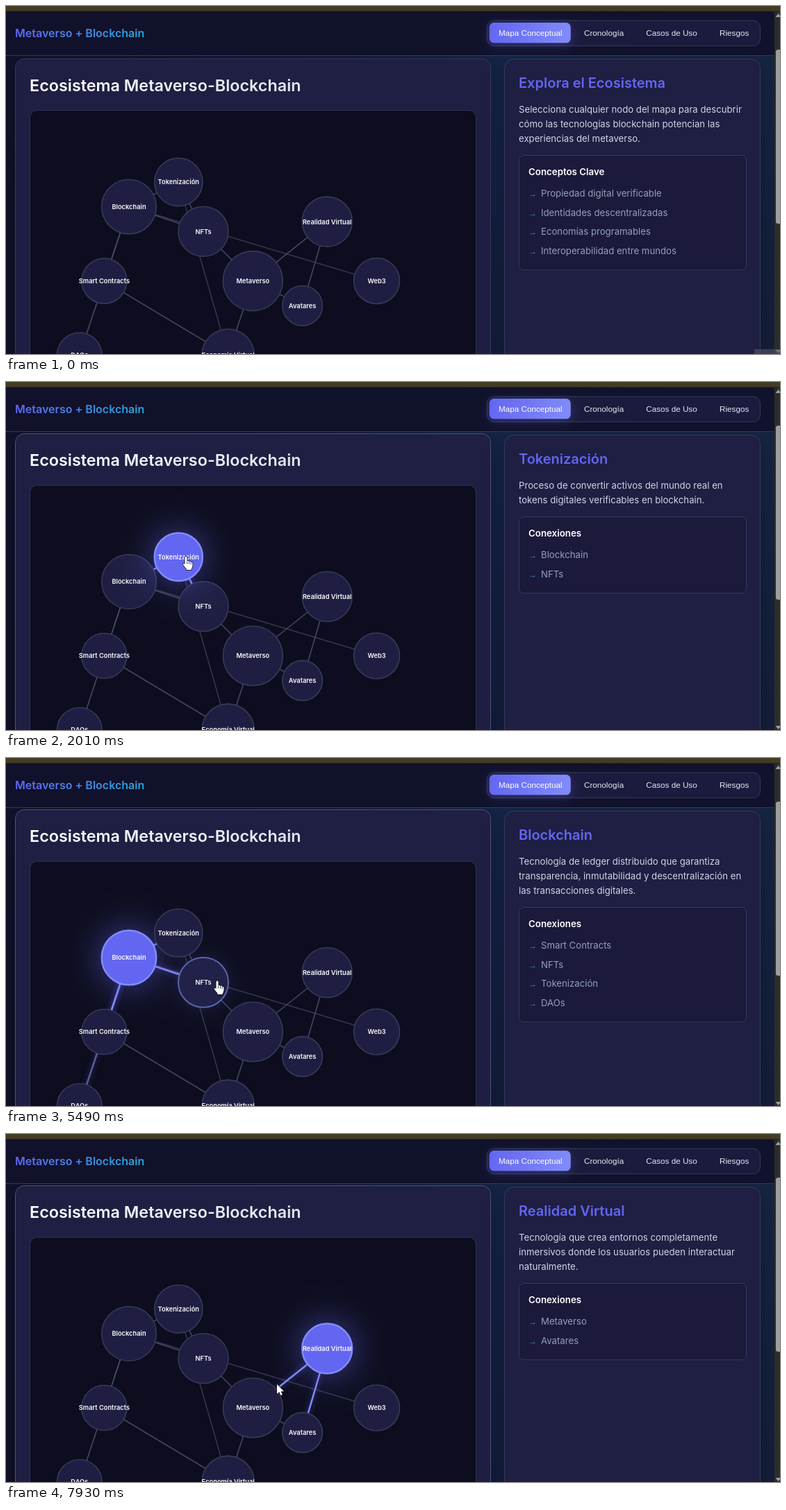
Write an HTML page with a canvas that moves like this. It is 1114 px wide and 502 px high and loops after 8 s.

```html
<!DOCTYPE html>
<html lang="es">
<head>
<meta charset="utf-8">
<title>Ecosistema</title>
<style>
html, body { margin: 0; width: 100%; height: 100%; overflow: hidden; background: #11112c; }
canvas { display: block; }
</style>
</head>
<body>
<canvas id="stage" width="1114" height="502"></canvas>
<script>
const ctx = document.getElementById('stage').getContext('2d');
const W = 1114, H = 502, LOOP = 8000;
const SANS = 'Inter, sans-serif';
const NAV = '"Liberation Sans", Arial, sans-serif';
const CARD = '#1f1e43', EDGE = '#343c5a';

// name: x, y, radius
const nodes = {
  'Metaverso': [355.3, 395, 43],
  'Blockchain': [177, 288, 39.3],
  'NFTs': [284, 323.7, 36],
  'Smart Contracts': [141.4, 395, 32.5],
  'DAOs': [105.8, 502, 32.3],
  'Realidad Virtual': [462.2, 309.5, 36],
  'Avatares': [426.6, 430.7, 28.8],
  'Economía Virtual': [319.6, 502, 37.6],
  'Web3': [533.5, 395, 33],
  'Tokenización': [248.3, 252.4, 34.6]
};

// from, to, strength
const links = [
  ['Blockchain', 'Web3', 1],
  ['Tokenización', 'Economía Virtual', 1],
  ['Blockchain', 'DAOs', 1],
  ['Blockchain', 'Smart Contracts', 2],
  ['Blockchain', 'NFTs', 2],
  ['Blockchain', 'Tokenización', 2],
  ['Tokenización', 'NFTs', 2],
  ['NFTs', 'Metaverso', 2],
  ['Metaverso', 'Realidad Virtual', 2],
  ['Metaverso', 'Avatares', 2],
  ['Metaverso', 'Economía Virtual', 2],
  ['Realidad Virtual', 'Avatares', 2],
  ['Smart Contracts', 'DAOs', 1],
  ['Smart Contracts', 'Economía Virtual', 2]
];

const intro = {
  title: 'Explora el Ecosistema',
  body: ['Selecciona cualquier nodo del mapa para descubrir',
    'cómo las tecnologías blockchain potencian las', 'experiencias del metaverso.'],
  head: 'Conceptos Clave',
  items: ['Propiedad digital verificable', 'Identidades descentralizadas',
    'Economías programables', 'Interoperabilidad entre mundos']
};
const details = {
  'Tokenización': {
    body: ['Proceso de convertir activos del mundo real en', 'tokens digitales verificables en blockchain.'],
    items: ['Blockchain', 'NFTs']
  },
  'Blockchain': {
    body: ['Tecnología de ledger distribuido que garantiza',
      'transparencia, inmutabilidad y descentralización en', 'las transacciones digitales.'],
    items: ['Smart Contracts', 'NFTs', 'Tokenización', 'DAOs']
  },
  'NFTs': {
    body: ['Tokens no fungibles que representan la propiedad',
      'única de activos digitales como arte,', 'coleccionables, y elementos del metaverso.'],
    items: ['Metaverso', 'Blockchain', 'Tokenización']
  },
  'Realidad Virtual': {
    body: ['Tecnología que crea entornos completamente',
      'inmersivos donde los usuarios pueden interactuar', 'naturalmente.'],
    items: ['Metaverso', 'Avatares']
  }
};

const clicks = [[1610, 'Tokenización'], [3720, 'Blockchain'], [5900, 'NFTs'], [7430, 'Realidad Virtual']];
const hovers = [[960, 'Tokenización'], [3230, 'Blockchain'], [5080, ''], [5340, 'NFTs'],
  [6640, ''], [6800, 'Realidad Virtual'], [7700, '']];
// time, x, y of the pointer tip
const path = [[70, 1095, 500], [840, 437, 339], [1130, 259, 251], [2360, 259, 251], [3100, 225.5, 271],
  [3200, 225.5, 271], [3500, 195.5, 285], [4900, 195.5, 285], [5460, 304, 321], [6550, 304, 321],
  [6940, 456, 301], [7560, 456, 301], [7900, 390, 361]];

const clamp = v => Math.max(0, Math.min(1, v));
const smooth = v => v * v * (3 - 2 * v);
const ramp = (t, start, len = 300) => smooth(clamp((t - start) / len));
const mix = (a, b, k) => 'rgb(' + a.map((v, i) => Math.round(v + (b[i] - v) * k)) + ')';

// How far a node is into a state that starts and ends with the given events
function amount(events, name, t) {
  let best = 0;
  events.forEach(([start, who], i) => {
    if (who !== name) return;
    const end = events[i + 1] ? events[i + 1][0] : Infinity;
    best = Math.max(best, ramp(t, start) - ramp(t, end));
  });
  return best;
}

function pointer(t) {
  if (t < path[0][0]) return null;
  for (let i = 1; i < path.length; i++) {
    const [t0, x0, y0] = path[i - 1], [t1, x1, y1] = path[i];
    if (t < t1) {
      const k = smooth(clamp((t - t0) / (t1 - t0)));
      return [x0 + (x1 - x0) * k, y0 + (y1 - y0) * k];
    }
  }
  return path[path.length - 1].slice(1);
}

function linear(x0, y0, x1, y1, ...colors) {
  const g = ctx.createLinearGradient(x0, y0, x1, y1);
  colors.forEach((c, i) => g.addColorStop(i / (colors.length - 1), c));
  return g;
}

function box(x, y, w, h, r, fill, stroke) {
  ctx.beginPath();
  ctx.roundRect(x, y, w, h, r);
  ctx.fillStyle = fill;
  ctx.fill();
  if (!stroke) return;
  ctx.strokeStyle = stroke;
  ctx.lineWidth = 1;
  ctx.stroke();
}

function text(s, x, y, font, color, align = 'left') {
  ctx.font = font;
  ctx.fillStyle = color;
  ctx.textAlign = align;
  ctx.fillText(s, x, y);
}

function glow(color, blur, dy = 0) {
  ctx.shadowColor = color;
  ctx.shadowBlur = blur;
  ctx.shadowOffsetY = dy;
}

function card(x, y, w, h, stroke) {
  ctx.save();
  glow('rgba(0,0,0,.3)', 26, 7);
  box(x, y, w, h, 13, CARD);
  ctx.restore();
  box(x, y, w, h, 13, CARD, stroke);
}

function backdrop() {
  ctx.fillStyle = linear(0, 0, W, 0, '#11112c', '#131634', '#15264a', '#15253f');
  ctx.fillRect(0, 0, W, H);
  ctx.fillStyle = linear(0, 72, 0, H, 'rgba(15,15,40,0)', 'rgba(15,15,40,.3)');
  ctx.fillRect(0, 72, W, H - 72);
}

function header() {
  ctx.fillStyle = linear(0, 0, W, 0, '#11112b', '#10112a', '#11132e');
  ctx.fillRect(0, 7, W, 64);
  ctx.fillStyle = '#2f3a58';
  ctx.fillRect(0, 71, W, 1);
  text('Metaverso + Blockchain', 13, 45, '600 16.05px ' + SANS, linear(13, 0, 200, 0, '#6366f1', '#22a6da'));

  box(692.5, 21, 393, 36.5, 10, '#1b1b3d', '#303a58');
  ctx.save();
  glow('rgba(99,102,241,.32)', 15, 3);
  box(695.7, 24, 117, 29.3, 6.5, linear(696, 24, 812, 53, '#6366f1', '#818cf8'));
  ctx.restore();
  const tabs = [['Mapa Conceptual', 709], ['Cronología', 832], ['Casos de Uso', 921.3], ['Riesgos', 1027]];
  tabs.forEach(([s, x], i) => text(s, x, 43.3, '11.7px ' + NAV, i ? '#e2e8f0' : '#ffffff'));
}

function chrome(t) {
  ctx.fillStyle = '#413c23';
  ctx.fillRect(0, 0, W, 7.5);
  ctx.fillStyle = '#2c2c29';
  ctx.fillRect(1106, 8, 8, H - 8);
  box(1108, 63, 8, 251, 3, '#9d9d9d');
  ctx.fillStyle = '#a0a0a0';
  ctx.beginPath();
  ctx.moveTo(1107.5, 16);
  ctx.lineTo(1111.5, 11);
  ctx.lineTo(1115.5, 16);
  ctx.fill();
  ctx.beginPath();
  ctx.moveTo(1107.5, 496);
  ctx.lineTo(1115.5, 496);
  ctx.lineTo(1111.5, 501);
  ctx.fill();
  if (t < 70) {
    ctx.fillStyle = 'rgba(85,85,105,.6)';
    ctx.fillRect(1077, 495, 37, 7);
  }
}

function drawLinks(t) {
  for (const [a, b, n] of links) {
    const [x0, y0] = nodes[a], [x1, y1] = nodes[b];
    const listed = (from, to) => details[from] && details[from].items.includes(to) ? amount(clicks, from, t) : 0;
    const on = Math.max(listed(a, b), listed(b, a));
    ctx.save();
    ctx.globalAlpha = n > 1 ? 0.85 + 0.15 * on : 0.6 + 0.1 * on;
    ctx.strokeStyle = mix([75, 83, 108], [129, 140, 248], on);
    ctx.lineWidth = 1.6 + 0.9 * on;
    if (on > 0) glow(`rgba(99,102,241,${0.6 * on})`, 9);
    ctx.beginPath();
    ctx.moveTo(x0, y0);
    ctx.lineTo(x1, y1);
    ctx.stroke();
    ctx.restore();
  }
}

function drawNode(name, t) {
  const [x, y, r] = nodes[name];
  const sel = amount(clicks, name, t), hov = amount(hovers, name, t);
  const lit = Math.max(sel, hov);
  const base = [31 + 6 * hov, 30 + 6 * hov, 66 + 14 * hov];
  ctx.save();
  ctx.beginPath();
  ctx.arc(x, y, r, 0, Math.PI * 2);
  ctx.fillStyle = mix(base, [99, 102, 241], sel);
  if (lit > 0) glow(`rgba(99,102,241,${Math.max(0.62 * sel, 0.42 * hov)})`, 28 + 24 * sel);
  ctx.fill();
  glow('transparent', 0);
  ctx.strokeStyle = mix([50, 60, 84], [129, 140, 248], lit);
  ctx.lineWidth = 1.6 + 0.9 * lit;
  ctx.stroke();
  ctx.restore();
  text(name, x, y + 3.4, '600 9.28px ' + SANS, '#f8fafc', 'center');
}

function mapCard(t) {
  const lift = ramp(t, 480);
  ctx.save();
  ctx.translate(0, 1.6 * (1 - lift));
  card(13.5, 74.5, 684, 480, mix([52, 60, 90], [78, 84, 122], lift));
  text('Ecosistema Metaverso-Blockchain', 34, 121, '600 23.35px ' + SANS,
    linear(34, 0, 424, 0, '#ffffff', '#dfe5ee'));
  box(34.5, 149, 642, 430, 10, '#0d0d1f', '#2d3552');
  drawLinks(t);
  Object.keys(nodes).forEach(name => drawNode(name, t));
  ctx.restore();
}

function infoCard(t) {
  const last = clicks.filter(c => c[0] <= t).pop();
  const info = last ? { title: last[1], head: 'Conexiones', ...details[last[1]] } : intro;
  const x = 738;
  card(717.5, 76.5, 368, 480, EDGE);
  text(info.title, x, 118.4, '600 20px ' + SANS, '#6366f1');
  info.body.forEach((s, i) => text(s, x, 153.9 + 20.8 * i, '13.2px ' + SANS, '#cfd6e2'));

  const top = 152.8 + 20.8 * info.body.length;
  box(x + 0.5, Math.round(top) + 0.5, 327, 55 + 27.6 * info.items.length, 6.5, '#1b1a3b', EDGE);
  text(info.head, x + 14, top + 28.9, '600 13.3px ' + SANS, '#ffffff');
  info.items.forEach((s, i) => {
    const y = top + 59.7 + 27.6 * i;
    text('→', x + 14, y, '12px ' + NAV, '#3494d8');
    text(s, x + 32, y, '13.2px ' + SANS, '#94a0b8');
  });
}

const hand = new Path2D('M3 1.6Q4.5-.6 6 1.6V7.6Q8 6.4 9 8Q11 7 11.7 8.8Q14 8.4 14 10.6V14' +
  'Q13.6 17 12.2 18.4V20H5V18.4Q3 16.4.3 12.6Q-.4 10 3 11.6Z');
const fingers = new Path2D('M6.2 8V11.5M9 8.4V11.6M11.6 9.2V12');
const arrow = new Path2D('M0 0V14L3.2 11L5.4 16L7.8 15L5.7 10.2H10Z');

function drawPointer(t) {
  const p = pointer(t);
  if (!p) return;
  const [x, y] = p;
  const dy = 1.6 * (1 - ramp(t, 480));
  const over = Object.values(nodes).some(n => Math.hypot(x - n[0], y - n[1] - dy) < n[2]);
  if (clicks.some(([at]) => t >= at - 80 && t < at + 80)) {
    ctx.fillStyle = 'rgba(185,174,30,.82)';
    ctx.beginPath();
    ctx.arc(x, y, 10.5, 0, Math.PI * 2);
    ctx.fill();
  }
  ctx.save();
  ctx.translate(over ? x - 4.5 : x, y);
  ctx.lineJoin = 'round';
  ctx.lineWidth = 1.4;
  ctx.strokeStyle = '#0a0a14';
  ctx.fillStyle = '#ffffff';
  const shape = over ? hand : arrow;
  ctx.stroke(shape);
  ctx.fill(shape);
  if (over) {
    ctx.lineWidth = 0.8;
    ctx.stroke(fingers);
  }
  ctx.restore();
}

function frame(now) {
  const t = now % LOOP;
  backdrop();
  mapCard(t);
  infoCard(t);
  header();
  chrome(t);
  drawPointer(t);
}

const begin = performance.now();
function tick() {
  frame(performance.now() - begin);
  requestAnimationFrame(tick);
}
tick();
</script>
</body>
</html>
```
